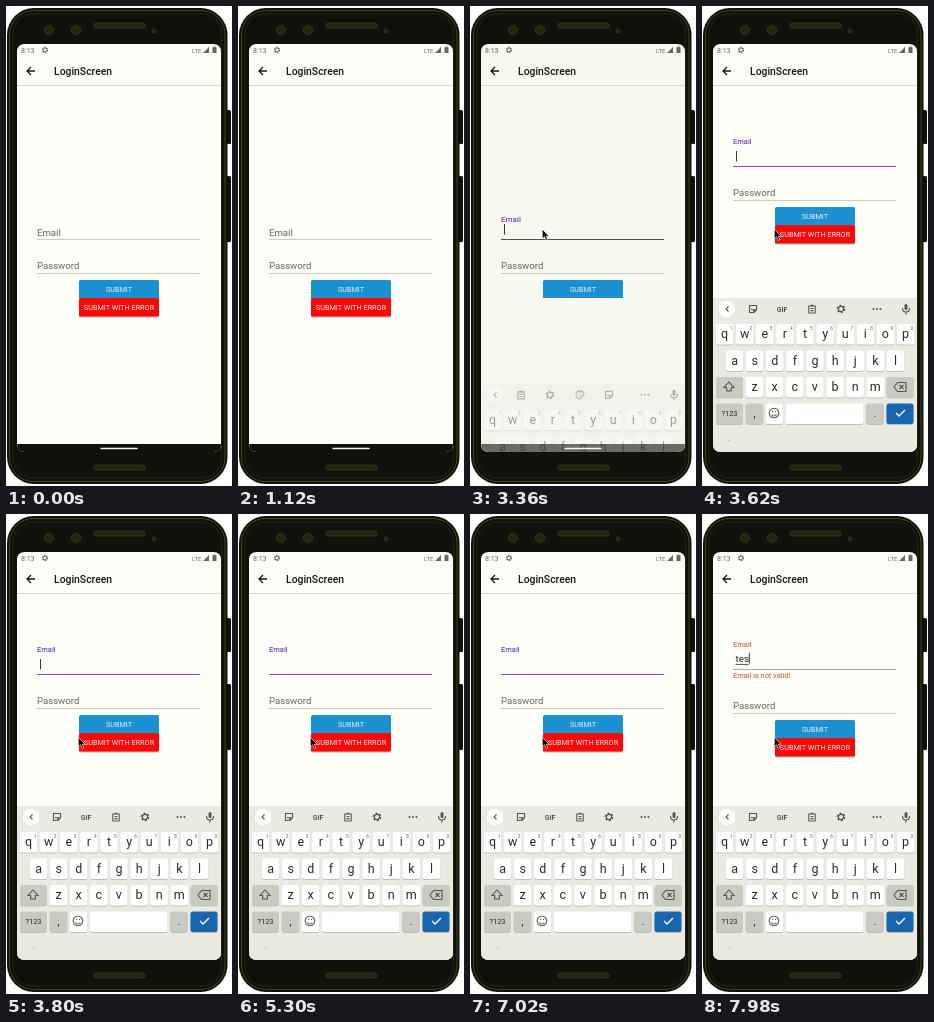
Write an HTML page that moves like this. It is 226 px wide and 480 px high and loops after 8 s.

```html
<!DOCTYPE html>
<html lang="en">
<head>
<meta charset="utf-8">
<title>Login form</title>
<style>
html, body { margin: 0; width: 100%; height: 100%; overflow: hidden; background: #fff; }
svg { display: block; width: 100vw; height: 100vh; font-family: Roboto, sans-serif; }
.mid { text-anchor: middle; }
.icon { fill: none; stroke: #55574f; stroke-width: 1.1; }
</style>
</head>
<body>
<svg viewBox="0 0 226 480" id="stage">
  <defs>
    <clipPath id="screenClip"><path d="M11 46q0-8 8-8H207q8 0 8 8V438q0 8-8 8H19q-8 0-8-8z"/></clipPath>
    <clipPath id="formClip"><rect id="formArea" x="11" y="80" width="204" height="358"/></clipPath>
    <g id="gear" class="icon">
      <circle r="2.6"/><circle r="3.6" stroke-width="1.5" stroke-dasharray="1.9 1.87"/>
    </g>
    <g id="sticker" class="icon">
      <path d="M-3.5-3.5h7V1L1 3.5h-4.5zM3.5 1H1v2.5M-1.8 0q1.5 2 3 0"/>
    </g>
    <g id="clip" class="icon">
      <path d="M-3.2-3h6.4v7h-6.4zM-1.5-3.6h3M-1.5-.5h3M-1.5 1.6h3"/>
    </g>
    <g id="palette" class="icon">
      <path d="M0-4a4 4 0 1 0 0 8q1.5-.4.8-1.8T3 1.2Q4 1 4 0A4 4 0 0 0 0-4z"/>
      <path d="M-2 0h.8M-.8-2h.8M1.5-1.5h.8"/>
    </g>
  </defs>

  <g fill="#10110b">
    <rect x="219" y="104" width="6" height="34" rx="1.5"/>
    <rect x="219" y="170" width="6" height="66" rx="1.5"/>
    <rect x="1" y="2" width="220.5" height="476" rx="27"/>
  </g>
  <g fill="none" stroke="#45451c">
    <rect x="3.5" y="4.5" width="215.5" height="471" rx="24"/>
    <rect x="7" y="8" width="208.5" height="464" rx="20" stroke="#25250f"/>
  </g>
  <g fill="#24240f" stroke="#3b3b17" stroke-width=".8">
    <circle cx="43" cy="24" r="4.5"/><circle cx="70" cy="24" r="4.5"/>
    <rect x="88" y="17" width="51" height="5" rx="2.5"/>
    <circle cx="148" cy="25" r="2"/>
    <rect x="88" y="459" width="51" height="5" rx="2.5"/>
  </g>

  <g clip-path="url(#screenClip)">
    <rect id="backdrop" x="11" y="38" width="204" height="408"/>
    <g fill="#65675c" font-size="7">
      <text x="15" y="47">8:13</text>
      <text x="186" y="46.5" font-size="6">LTE</text>
      <use href="#gear" transform="translate(39 44) scale(.72)"/>
      <path d="M197 47l6-6v6zM206.5 41.5h1v-1h2v1h1V47h-4z"/>
    </g>
    <path d="M29 65h-8m4-4l-4 4 4 4" fill="none" stroke="#181914" stroke-width="1.3"/>
    <text x="48" y="69" font-size="10.4" font-weight="500" fill="#171813">LoginScreen</text>
    <path d="M11 79.5H215" stroke="#d8d9ce"/>

    <g clip-path="url(#formClip)">
      <g id="emailGroup">
        <text id="label" x="31">Email</text>
        <text id="typed" x="33.5" y="221.5" font-size="9.8" fill="#22231e"></text>
        <path id="wordLine" stroke="#22231e" stroke-width=".8"/>
        <path id="caret" d="M0 218v10.500" stroke="#303a30" stroke-width="1"/>
        <path id="emailLine" d="M31 233.500H194"/>
        <text id="error" x="31" y="242" font-size="7.4" fill="#c9511f">Email is not valid!</text>
      </g>
      <g id="lowerGroup">
        <text x="31" y="263" font-size="9.6" fill="#66675a">Password</text>
        <path d="M31 267.500H194" stroke="#cccdbe"/>
        <rect x="73" y="293" width="80" height="18.500" rx="1.5" fill="#bcbdb2"/>
        <rect x="73" y="274" width="80" height="19" rx="1.500" fill="#1b91d2"/>
        <rect x="73" y="292" width="80" height="18.500" rx="1.500" fill="#fa0807"/>
        <g class="mid" font-size="7.3" fill="#eef2ec">
          <text x="113" y="285.700">SUBMIT</text>
          <text x="113" y="304">SUBMIT WITH ERROR</text>
        </g>
      </g>
    </g>

    <g id="keyboard">
      <rect id="kbBack" x="11" y="292" width="204" height="170"/>
      <g id="kbParts">
        <circle cx="25" cy="303" r="8" fill="#fff"/>
        <path class="icon" d="M26.500 300.500l-2.500 2.500 2.500 2.500"/>
        <g id="toolsFinal">
          <use href="#sticker" x="51" y="303"/>
          <text class="mid" x="80" y="305.500" font-size="7" font-weight="700" fill="#55574f">GIF</text>
          <use href="#clip" x="110" y="303"/>
          <use href="#gear" x="139" y="303"/>
        </g>
        <g id="toolsFirst">
          <use href="#clip" x="51" y="303"/>
          <use href="#gear" x="80" y="303"/>
          <use href="#palette" x="110" y="303"/>
          <use href="#sticker" x="139" y="303"/>
        </g>
        <g fill="#55574f">
          <circle cx="171.500" cy="303" r="1"/><circle cx="175" cy="303" r="1"/><circle cx="178.500" cy="303" r="1"/>
          <rect x="202.500" y="298" width="3" height="6" rx="1.500"/>
        </g>
        <path class="icon" d="M200.500 302q0 4 3.500 4t3.500-4M204 306v2.500"/>
        <g id="keys"></g>
        <path class="icon" d="M27 376l-5 5.500h2.700v3.500h4.600v-3.500H32z"/>
        <path class="icon" d="M192 381l3.500-4.500h8.500v9h-8.500zM197.500 379l4 4m0-4l-4 4"/>
        <g class="icon"><circle cx="72" cy="407" r="4.800"/><path d="M69.500 408.500q2.500 3 5 0M70 405.500h1M73 405.500h1"/></g>
        <path d="M194 407l3 3 6-6" fill="none" stroke="#fff" stroke-width="1.400"/>
        <path d="M25 433l2 2 2-2" fill="none" stroke="#c6c8bd"/>
      </g>
    </g>
    <rect id="navBar" x="11" y="438" width="204" height="8" fill="#10110b"/>
    <path id="homeBar" d="M94.500 442.500H131.500" stroke="#f2f3ea" stroke-width="1.600"/>
  </g>

  <path id="pointer" d="M0 0v9.500l2.200-2 1.600 3.600 1.700-.8-1.600-3.400h3z" fill="#0c0c0a" stroke="#fff" stroke-width=".6"/>
</svg>
<script>
const LOOP = 8000;
const POINTER_IN = 1960, POINTER_STOP = 2180;
const FOCUS = 3250, SLIDE = 3300, SLIDE_TIME = 220, RESIZE = 3440;
const BLINK_START = 3350, BLINK = 488;
const TYPING = [[7100, 't'], [7400, 'te'], [7700, 'tes']];
const CARET_X = { '': 34.5, t: 37.2, te: 42.3, tes: 47.3 };

const el = {};
document.querySelectorAll('[id]').forEach(node => el[node.id] = node);
const set = (node, attrs) => {
  for (const name in attrs) node.setAttribute(name, attrs[name]);
};
const show = (node, on) => { node.style.display = on ? '' : 'none'; };
const clamp = x => Math.max(0, Math.min(1, x));
const mix = (a, b, p) => a + (b - a) * p;
const moveY = (node, y) => set(node, { transform: `translate(0 ${y})` });

function key(x, y, w, text = '', fill = '#fff', size = 12.5) {
  const label = text && `<text class="mid" x="${x}" y="${y + size * .34}" font-size="${size}" fill="#292b25">${text}</text>`;
  return `<rect x="${x - w / 2}" y="${y - 9.5}" width="${w}" height="21" rx="2.5" fill="#bfc1b6"/>` +
    `<rect x="${x - w / 2}" y="${y - 10}" width="${w}" height="20.5" rx="2.5" fill="${fill}"/>${label}`;
}

function buildKeys() {
  const grey = '#c9cbc2';
  let out = '';
  const row = (letters, x, y) => [...letters].forEach((c, i) => {
    out += key(x + i * 20.1, y, 17.6, c);
  });
  row('qwertyuiop', 22.6, 328);
  row('asdfghjkl', 32.6, 354.5);
  row('zxcvbnm', 52.6, 381);
  for (let i = 0; i < 10; i++) {
    out += `<text class="mid" x="${29 + i * 20.1}" y="323.5" font-size="4.8" fill="#66685f">${(i + 1) % 10}</text>`;
  }
  out += key(27.5, 381, 27, '', grey) + key(198, 381, 27, '', grey);
  out += key(27.5, 407.5, 27, '?123', grey, 7.5) + key(52.5, 407.5, 17.6, ',', grey, 10);
  out += key(72.5, 407.5, 17.6) + key(122.5, 407.5, 78);
  out += key(173, 407.5, 17.6, '.', grey, 10) + key(198, 407.5, 27, '', '#1767ae');
  el.keys.innerHTML = out;
}

function drawForm(t) {
  const focused = t >= FOCUS, resized = t >= RESIZE;
  const step = TYPING.filter(([at]) => t >= at).pop();
  const text = step ? step[1] : '';
  const invalid = text !== '';
  const shift = resized ? -73 : 0;
  moveY(el.emailGroup, shift - (invalid ? 5 : 0));
  moveY(el.lowerGroup, shift + (invalid ? 5 : 0));
  set(el.formArea, { height: t >= SLIDE ? 212 : 358 });

  const float = clamp((t - FOCUS) / 150);
  set(el.label, {
    y: mix(229.8, 211, float),
    'font-size': mix(9.6, 7.5, float),
    fill: invalid ? '#c9511f' : focused ? '#5318b4' : '#66675a'
  });
  set(el.emailLine, {
    stroke: invalid ? '#c4a88f' : resized ? '#8b45c4' : focused ? '#55504f' : '#cccdbe',
    'stroke-width': focused && !invalid ? 1.2 : 1
  });

  el.typed.textContent = text;
  const end = CARET_X[text];
  set(el.wordLine, { d: invalid ? `M33.5 228.4H${end - .5}` : '' });
  set(el.caret, { transform: `translate(${end} ${invalid ? -1 : 0})` });
  const blinkOn = Math.floor((t - BLINK_START) / BLINK) % 2 === 0;
  show(el.caret, t >= BLINK_START && (invalid || blinkOn));
  show(el.error, invalid);
  set(el.typed, { y: 226 });
}

function drawKeyboard(t) {
  const p = clamp((t - SLIDE) / SLIDE_TIME);
  const sliding = p > 0 && p < 1;
  show(el.keyboard, p > 0);
  moveY(el.keyboard, 154 * Math.pow(1 - p, 1.8));
  set(el.kbBack, { fill: sliding ? '#f1f2e9' : '#e9ebe2' });
  set(el.kbParts, { opacity: mix(.35, 1, clamp((p - .2) / .8)) });
  show(el.toolsFinal, p === 1);
  show(el.toolsFirst, p < 1);
  show(el.navBar, p < 1);
  show(el.homeBar, p < 1);
  set(el.navBar, { opacity: p > 0 ? .6 : 1 });
  set(el.backdrop, { fill: sliding ? '#f7f8ef' : '#fdfef8' });
}

function drawPointer(t) {
  const p = clamp((t - POINTER_IN) / (POINTER_STOP - POINTER_IN));
  const ease = 1 - (1 - p) ** 2;
  show(el.pointer, t >= POINTER_IN);
  set(el.pointer, { transform: `translate(${mix(150, 72.3, ease)} ${mix(300, 223.3, ease)})` });
}

function draw(t) {
  drawForm(t);
  drawKeyboard(t);
  drawPointer(t);
}

buildKeys();
const start = performance.now();
function tick() {
  draw((performance.now() - start) % LOOP);
  requestAnimationFrame(tick);
}
tick();
</script>
</body>
</html>
```
